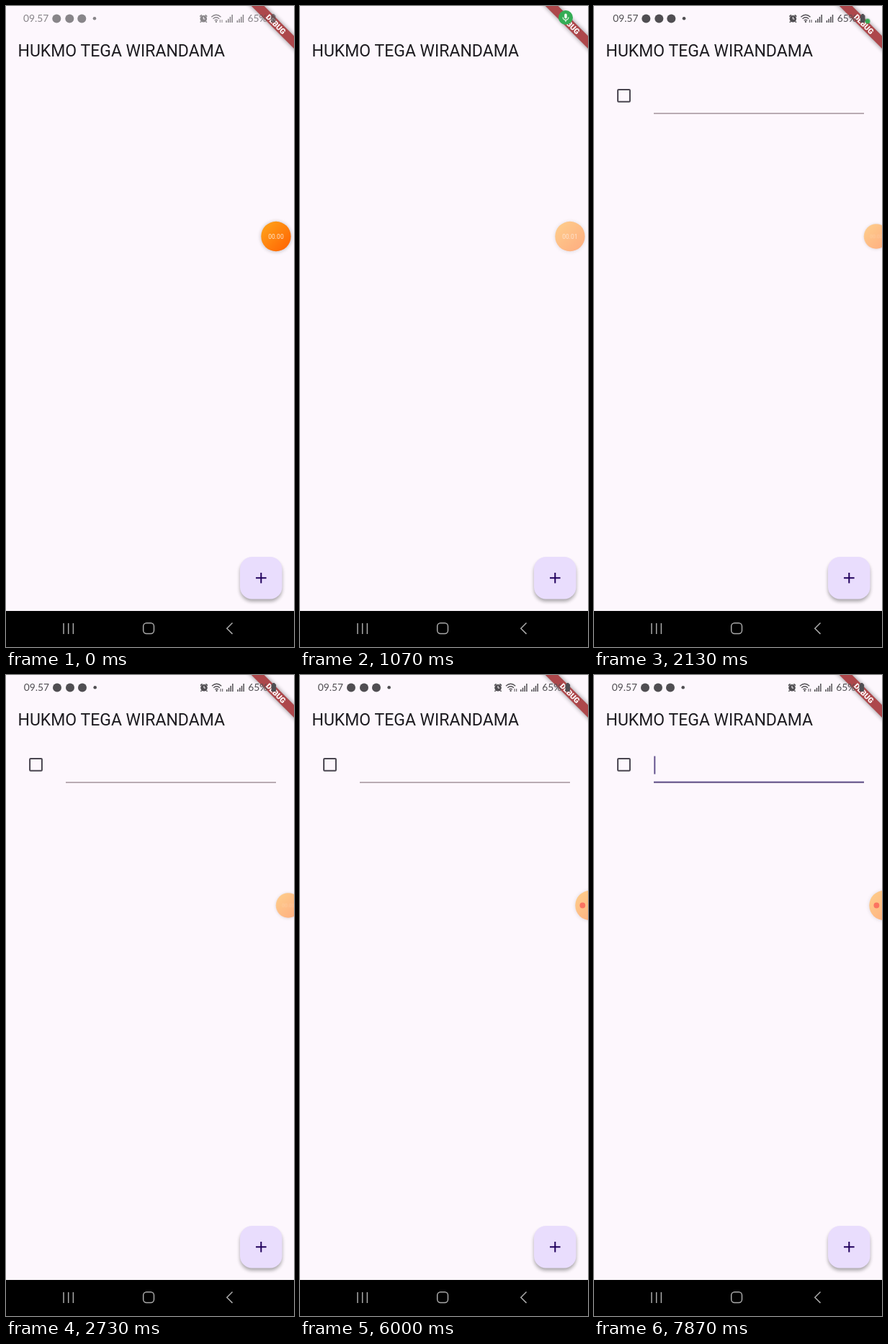
An HTML page for the animation above (8000 ms loop, 400 by 889 pixels).

```html
<!DOCTYPE html>
<html lang="id">
<head>
<meta charset="utf-8">
<title>Todo list</title>
<style>
  html, body { margin: 0; width: 100%; height: 100%; overflow: hidden; background: #fdf7fd; }
  svg { display: block; width: 100%; height: 100%; }
  text { font-family: Roboto, sans-serif; }
  .status, .mic, .glyph, .fade, .bubble, .time, .digits, .tab, .press, .item, .focus, .caret {
    animation: 8s linear infinite both;
  }

  /* status bar and privacy indicator */
  .status { animation-name: status; }
  .status text { font: 13.8px Lato, sans-serif; }
  @keyframes status {
    0%, .86% { opacity: .68; transform: translateX(-.7px); }
    .875% { opacity: .5; transform: translateX(-.7px); }
    3.375% { opacity: 0; transform: translateX(-.7px); }
    23.375% { opacity: 0; transform: translateX(1.4px); }
    26.2% { opacity: 1; transform: translateX(1.4px); }
    27% { opacity: 1; transform: translateX(1.3px); }
    30%, 100% { opacity: 1; transform: none; }
  }
  .mic { animation-name: mic; }
  @keyframes mic {
    0%, .86% { opacity: 0; transform: translate(369px, 16px) scale(.3); }
    .875% { opacity: .4; transform: translate(369px, 16px) scale(.4); }
    3.375%, 23.375% { opacity: 1; transform: translate(369px, 16px); }
    26.5%, 28% { opacity: 1; transform: translate(380px, 21px) scale(.34); }
    30%, 100% { opacity: 0; transform: translate(380px, 21px) scale(.1); }
  }
  .glyph { animation-name: glyph; }
  @keyframes glyph { 0%, 23.375% { opacity: 1; } 25%, 100% { opacity: 0; } }

  /* recorder bubble */
  .fade { animation-name: fade; }
  @keyframes fade {
    0%, 13.37% { opacity: 1; }
    13.375%, 63.37% { opacity: .5; }
    63.375%, 100% { opacity: 0; }
  }
  .bubble { animation-name: dock; transform-origin: 375px 319.5px; }
  @keyframes dock {
    0%, 13.375% { transform: none; animation-timing-function: ease-in-out; }
    18.375%, 100% { transform: translateX(17px) scale(.83); }
  }
  .time { animation-name: time; }
  @keyframes time {
    0%, 13.37% { opacity: .8; }
    13.375% { opacity: .6; }
    18.375%, 100% { opacity: .25; }
  }
  .digits { animation-name: count; animation-timing-function: step-end; }
  @keyframes count {
    0% { transform: none; }
    5.875% { transform: translateY(-20px); }
    20% { transform: translateY(-40px); }
    34.125% { transform: translateY(-60px); }
    47.5% { transform: translateY(-80px); }
    60.875%, 100% { transform: translateY(-100px); }
  }
  .tab { animation-name: tab; animation-timing-function: step-end; }
  @keyframes tab { 0% { opacity: 0; } 63.375%, 100% { opacity: 1; } }

  /* list item */
  .press { animation-name: press; }
  @keyframes press {
    0%, 19.3% { opacity: 0; }
    20% { opacity: .06; }
    21.625%, 100% { opacity: 0; }
  }
  .item { animation-name: item; animation-timing-function: step-end; }
  @keyframes item { 0% { opacity: 0; } 20%, 100% { opacity: 1; } }
  .focus { animation-name: focus; }
  @keyframes focus { 0%, 95.87% { opacity: 0; } 98.375%, 100% { opacity: 1; } }
  .caret { animation-name: caret; animation-timing-function: step-end; }
  @keyframes caret { 0% { opacity: 0; } 95.875%, 100% { opacity: 1; } }
</style>
</head>
<body>
<svg viewBox="0 0 400 889">
  <defs>
    <linearGradient id="orange" x1="0" y1="0" x2="1" y2="1">
      <stop offset=".1" stop-color="#ffa019"/>
      <stop offset=".9" stop-color="#ff6604"/>
    </linearGradient>
    <filter id="soft" x="-30%" y="-30%" width="160%" height="160%">
      <feGaussianBlur stdDeviation="2.6"/>
    </filter>
    <filter id="ribbonSoft" x="-10%" y="-100%" width="120%" height="300%">
      <feGaussianBlur stdDeviation="3"/>
    </filter>
    <clipPath id="digitBox"><rect x="380" y="312" width="8" height="14"/></clipPath>
  </defs>

  <rect width="400" height="889" fill="#fdf7fd"/>
  <text x="16.5" y="69.6" font-size="23" fill="#1d1b20">HUKMO TEGA WIRANDAMA</text>

  <g class="item">
    <rect x="33.1" y="115.9" width="16.8" height="16.8" rx="1" fill="none" stroke="#49454f" stroke-width="2"/>
    <rect x="83" y="148.5" width="292" height="1" fill="#77606b"/>
    <rect class="focus" x="83" y="147.6" width="292" height="2" fill="#65558f"/>
    <rect class="caret" x="83.3" y="112.5" width="2" height="25" fill="#65558f"/>
  </g>

  <!-- add button -->
  <rect x="325" y="768" width="58.5" height="58" rx="17" opacity=".32" filter="url(#soft)"/>
  <rect x="325" y="764" width="58.5" height="58.5" rx="16.7" fill="#e9ddfd"/>
  <rect class="press" x="325" y="764" width="58.5" height="58.5" rx="16.7" fill="#21005d"/>
  <path d="M347 793.2h14.6M354.3 785.9v14.6" stroke="#21005d" stroke-width="2"/>

  <!-- corner ribbon -->
  <g transform="translate(400 0) rotate(45)">
    <rect x="-70" y="29.3" width="140" height="12.5" opacity=".45" filter="url(#ribbonSoft)"/>
    <rect x="-70" y="29.3" width="140" height="12.5" fill="#ad474b"/>
    <text y="39.4" font-size="10.6" font-weight="900" text-anchor="middle" fill="#fff">DEBUG</text>
  </g>

  <g class="status" fill="#504e52">
    <text x="24.8" y="22.3">09.57</text>
    <circle cx="71" cy="17.5" r="6"/>
    <circle cx="89" cy="17.5" r="6"/>
    <circle cx="106" cy="17.5" r="6"/>
    <circle cx="123.7" cy="17.3" r="2.3"/>
    <!-- alarm -->
    <circle cx="275" cy="17.8" r="4.8"/>
    <path d="M270 14.6l2.6-2.2M280 14.6l-2.6-2.2M271.6 21.6l-1.2 1.2M278.4 21.6l1.2 1.2" stroke="#504e52" stroke-width="1.5"/>
    <path d="M275 15v3h2.2" fill="none" stroke="#fdf7fd"/>
    <!-- wifi -->
    <g fill="none" stroke="#504e52" stroke-width="1.3">
      <path d="M286 15.2q6.6-6 13.2 0M288.2 17.7q4.4-3.8 8.8 0M290.3 20q2.3-1.8 4.6 0"/>
      <path d="M298 19v4M300.7 19v4" stroke-width="1"/>
    </g>
    <circle cx="292.6" cy="21.8" r="1.2"/>
    <!-- signal bars -->
    <path id="bars" d="M306 20h1.5v3H306zM308.7 17.7h1.5V23h-1.5zM311.4 15h1.5v8h-1.5zM314.1 12h1.5v11h-1.5z"/>
    <use href="#bars" x="15.3"/>
    <text x="336.3" y="22.3">65%</text>
    <rect x="368.5" y="12.3" width="6.6" height="10.7" rx="1.5"/>
    <rect x="370.3" y="11" width="3" height="2"/>
  </g>

  <g class="mic">
    <circle r="10" fill="#34ad55"/>
    <g class="glyph" fill="none" stroke="#f2fbf2">
      <path d="M0-3.6v3.4" stroke-width="3.6" stroke-linecap="round"/>
      <path d="M-3.9-.4a3.9 3.9 0 0 0 7.8 0M0 3.5v2.6" stroke-width="1.2"/>
    </g>
  </g>

  <g class="fade">
    <g class="bubble">
      <circle cx="375" cy="320" r="21.5" opacity=".2" filter="url(#soft)"/>
      <circle cx="375" cy="319.5" r="20.7" fill="url(#orange)"/>
      <g class="time" font-size="8.5" fill="#fff">
        <text x="364.3" y="322.6">00.0</text>
        <g clip-path="url(#digitBox)">
          <g class="digits">
            <text x="380.9" y="322.6">0</text>
            <text x="380.9" y="342.6">1</text>
            <text x="380.9" y="362.6">2</text>
            <text x="380.9" y="382.6">3</text>
            <text x="380.9" y="402.6">4</text>
            <text x="380.9" y="422.6">5</text>
          </g>
        </g>
      </g>
    </g>
  </g>

  <g class="tab">
    <g opacity=".5">
      <circle cx="403" cy="320" r="21.5" opacity=".2" filter="url(#soft)"/>
      <circle cx="403" cy="319.5" r="20.7" fill="url(#orange)"/>
    </g>
    <circle cx="392.4" cy="319.5" r="3.9" fill="#fb7361"/>
  </g>

  <!-- navigation bar -->
  <rect y="839" width="400" height="50"/>
  <g fill="none" stroke="#a9a9a9" stroke-width="1.5">
    <path d="M80 856v15M86.7 856v15M93.4 856v15"/>
    <rect x="190.7" y="855.7" width="14.8" height="14.8" rx="4.5"/>
    <path d="M314.5 855.5l-7.7 7.7 7.7 7.7"/>
  </g>
</svg>
</body>
</html>
```
